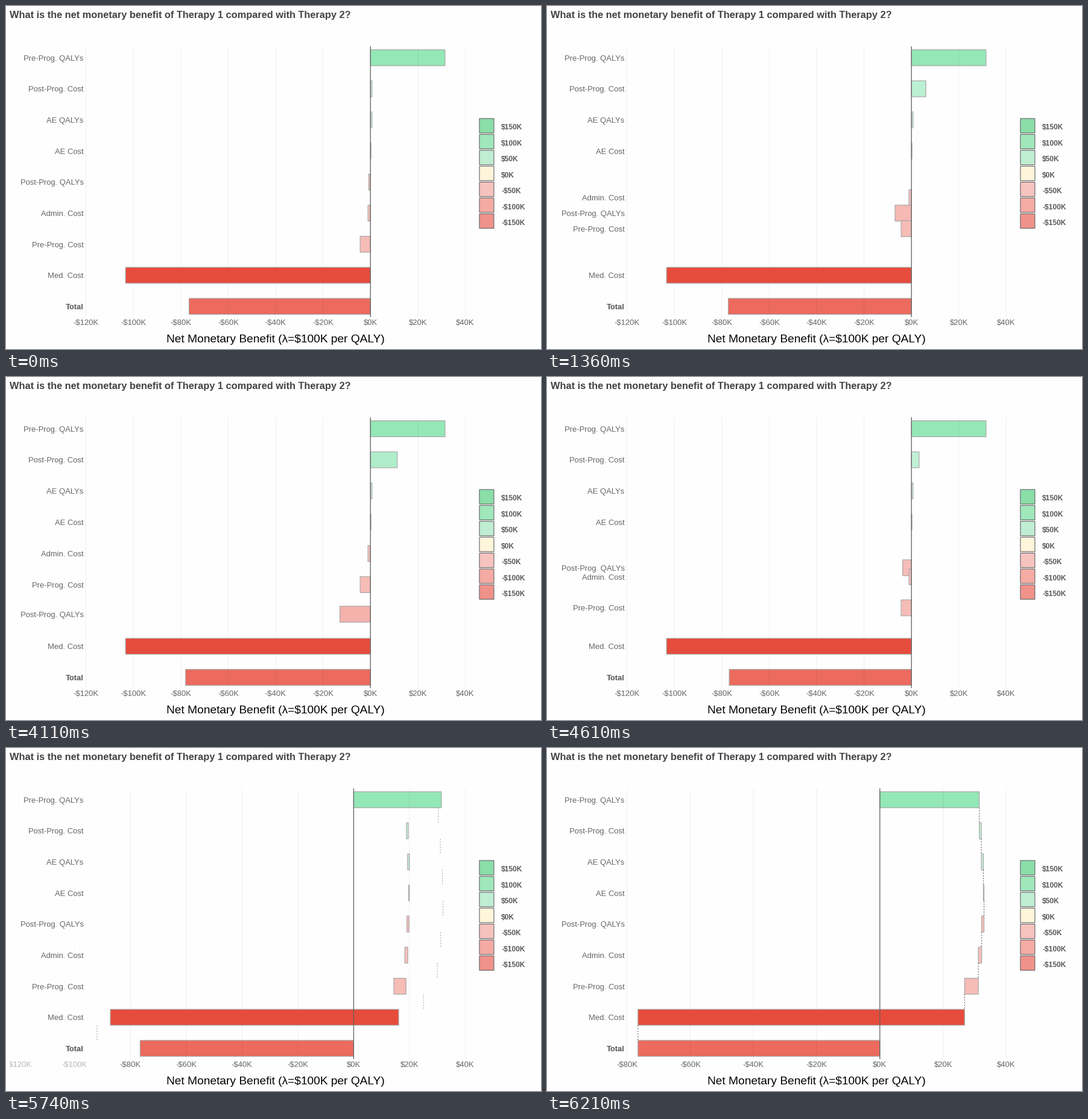
Animation of 887 by 570 pixels, one loop 8000 ms. Source, as a matplotlib script:

```python
import numpy as np
import matplotlib.pyplot as plt
from matplotlib.animation import FuncAnimation
from matplotlib.colors import to_rgb
from matplotlib.patches import Rectangle
from matplotlib.transforms import Bbox

W, H, DPI = 887, 570, 64
PT = 72 / DPI  # points per pixel
LOOP, STEP = 8000, 20

# Plot geometry in pixels
LEFT, RIGHT, TOP, BOTTOM = 132.5, 761.5, 67, 517
ROW_TOP, ROW_PITCH, BAR_H = 72.7, 51.65, 26.5

# Motion as (start, duration): values shift, shift back, then cascade
SHIFT, UNSHIFT, CASCADE = (860, 1000), (3950, 1000), (5260, 940)
# Instants at which the picture refreshes
UPDATES = np.array([
    0, 1010, *range(1060, 1781, 60), 1810,
    4110, *range(4140, 4861, 60), 4890,
    *range(5280, 5701, 60), *range(5740, 6041, 60), 6090, 6150, 6210])

# name, value and row before / after the shift, colours before / after
ITEMS = [
    ("Pre-Prog. QALYs", (31.45, 31.45), (0, 0), ("#94e7b6", "#94e7b6")),
    ("Post-Prog. Cost", (0.65, 11.5), (1, 1), ("#c6f2d9", "#b0edcb")),
    ("AE QALYs", (0.65, 0.65), (2, 2), ("#c6f2d9", "#c6f2d9")),
    ("AE Cost", (0.2, 0.2), (3, 3), ("#c8f2da", "#c8f2da")),
    ("Post-Prog. QALYs", (-0.75, -13.1), (4, 6), ("#f7c1bc", "#f5b1ab")),
    ("Admin. Cost", (-1.05, -1.05), (5, 4), ("#f7c0bb", "#f7c0bb")),
    ("Pre-Prog. Cost", (-4.35, -4.35), (6, 5), ("#f6bcb6", "#f6bcb6")),
    ("Med. Cost", (-103.3, -103.3), (7, 7), ("#e64c3c", "#e64c3c")),
]
LEGEND = [("$150K", "#8adea8"), ("$100K", "#a0e7bb"), ("$50K", "#c0eed3"),
          ("$0K", "#fff5da"), ("-$50K", "#f7c3bf"), ("-$100K", "#f5aba4"),
          ("-$150K", "#f0928a")]

plt.rcParams.update({"font.family": "Liberation Sans", "text.parse_math": False})
fig = plt.figure(figsize=(W / DPI, H / DPI), dpi=DPI, facecolor="#fefefe")
ax = fig.add_axes([0, 0, 1, 1])
ax.set_xlim(0, W)
ax.set_ylim(H, 0)
ax.axis("off")


def mix(a, b, k):
    return a + (b - a) * k


def ease(t, start, duration):
    """Cubic in-out."""
    u = np.clip((t - start) / duration, 0, 1)
    return 4 * u**3 if u < 0.5 else 1 - 4 * (1 - u)**3


def scale(low):
    unit = (RIGHT - LEFT) / (40 - low)
    return lambda value: RIGHT + (value - 40) * unit


wide, narrow = scale(-120), scale(-80)


def label(x, y, text, size, color="#666666", **kw):
    return ax.text(x, y, text, fontsize=size * PT, color=color,
                   va="baseline", zorder=8, **kw)


def box(x, y, w, h, fill, edge, lw, z):
    return ax.add_patch(Rectangle((x, y), w, h, facecolor=fill, edgecolor=edge,
                                  lw=lw * PT, zorder=z, snap=False))


def vline(x, y0, y1, color, lw, z, **kw):
    return ax.plot([x, x], [y0, y1], color=color, lw=lw * PT, zorder=z,
                   solid_capstyle="butt", snap=False, **kw)[0]


label(6, 20, "What is the net monetary benefit of Therapy 1 compared with Therapy 2?",
      16.4, "#444444", weight="bold")
label(447, 559, "Net Monetary Benefit (λ=$100K per QALY)", 19.1, "black", ha="center")

for i, (text, color) in enumerate(LEGEND):
    box(784.9, 187 + 26.4 * i, 24, 24, color, "#6c6c6c", 1.2, 2)
    label(821, 205.3 + 26.45 * i, text, 12, "#5c5c5c", weight="bold")

ticks = []
for value in range(-120, 41, 20):
    sign = "-" if value < 0 else ""
    text = label(0, 530, f"{sign}${abs(value)}K", 13, ha="center")
    text.set_clip_box(Bbox.from_extents(6, 0, W, H))
    text.set_clip_on(True)
    style = ("#606060", 1.3, 6) if value == 0 else ("black", 1, 3)
    opacity = 1 if value == 0 else 0.06
    ticks.append((value, text, vline(0, TOP, BOTTOM, *style), opacity))

bars, names = [], []
for name, *_ in ITEMS:
    z = 4 if name == "Med. Cost" else 2
    bars.append(box(0, 0, 1, BAR_H, "white", "#a8a8a8", 1.2, z))
    names.append(label(128.5, 0, name, 13, ha="right"))
total_bar = box(0, ROW_TOP + 8 * ROW_PITCH, 1, BAR_H, "#ec6a5e", "#a8a8a8", 1.2, 2)
label(128.5, ROW_TOP + 8 * ROW_PITCH + 18, "Total", 13, "#555555", ha="right", weight="bold")

running = np.cumsum([values[0] for _, values, *_ in ITEMS])
links = []
for i, value in enumerate(running):
    y = ROW_TOP + i * ROW_PITCH + BAR_H
    links.append(vline(narrow(value), y, y + ROW_PITCH - BAR_H, "#666666", 1.1, 5,
                       linestyle=(0, (2, 2)), dash_capstyle="butt"))


def span(bar, start, end):
    bar.set_x(min(start, end))
    bar.set_width(abs(end - start))


def draw(frame):
    now = frame * STEP + STEP / 2
    t = UPDATES[UPDATES <= now][-1]
    shift = ease(t, *SHIFT) - ease(t, *UNSHIFT)
    cascade = ease(t, *CASCADE)

    for value, text, line, opacity in ticks:
        x = mix(wide(value), narrow(value), cascade)
        shown = 1 - cascade if value < -80 else 1
        text.set_x(x)
        text.set_alpha(shown)
        line.set_xdata([x, x])
        line.set_alpha(opacity * shown)

    total = base = 0
    for (_, values, rows, colors), bar, name in zip(ITEMS, bars, names):
        value = mix(*values, shift)
        y = ROW_TOP + ROW_PITCH * mix(*rows, shift)
        span(bar, mix(wide(0), narrow(base), cascade),
             mix(wide(value), narrow(base + values[0]), cascade))
        bar.set_y(y)
        bar.set_facecolor(mix(*(np.array(to_rgb(c)) for c in colors), shift))
        name.set_y(y + 18)
        base += values[0]
        total += value

    span(total_bar, mix(wide(0), narrow(0), cascade),
         mix(wide(total), narrow(total), cascade))
    for link in links:
        link.set_alpha(cascade)
    return []


anim = FuncAnimation(fig, draw, frames=LOOP // STEP, interval=STEP, repeat=True,
                     repeat_delay=0, init_func=lambda: draw(0))
plt.show()
```
